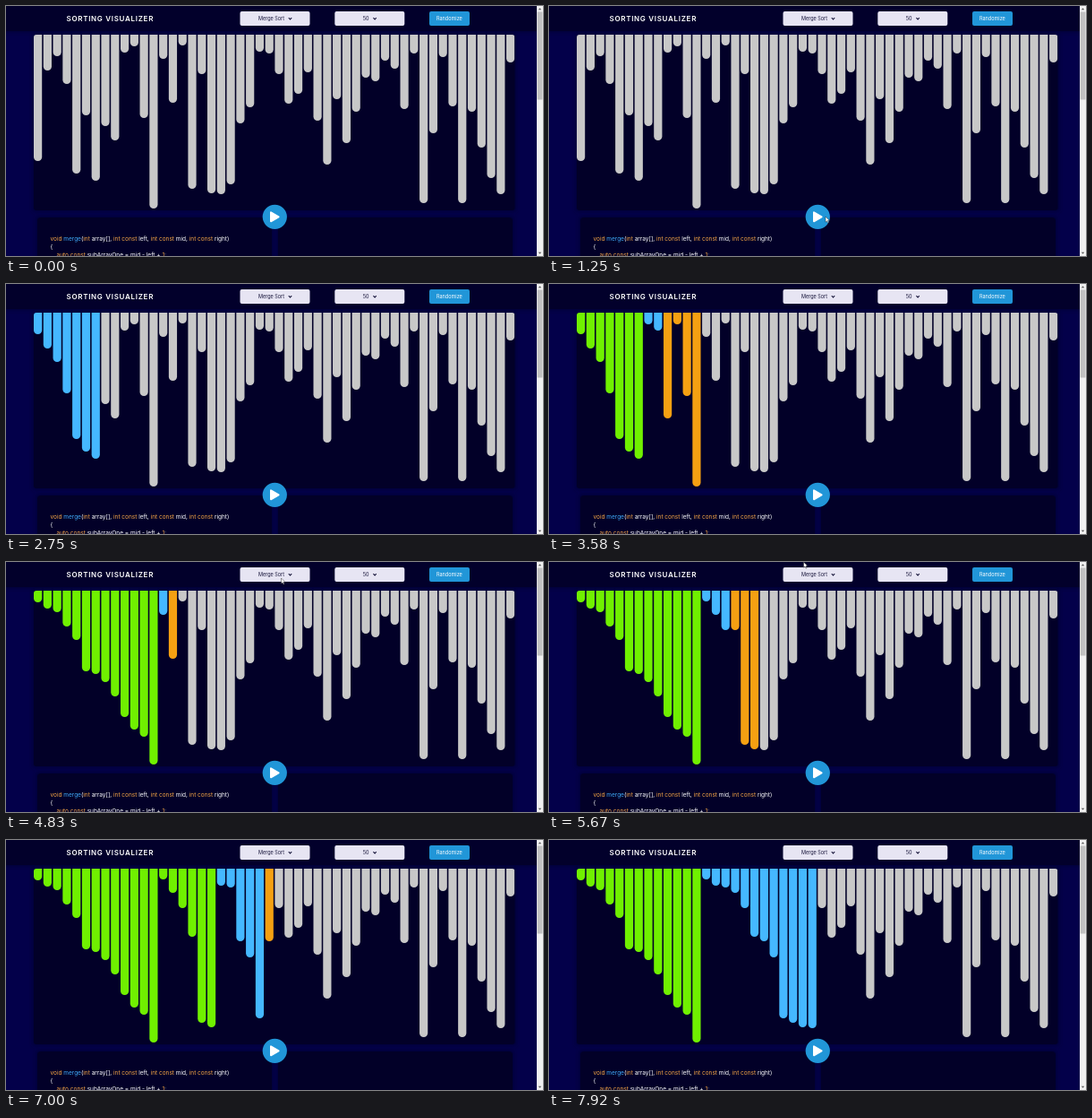
Recreate the animation shown at these times as an HTML page. Size 600 by 279 pixels, loop 8 s.

```html
<!DOCTYPE html>
<html lang="en">
<head>
<meta charset="utf-8">
<title>Sorting Visualizer</title>
<style>
  html, body { margin: 0; width: 100%; height: 100%; overflow: hidden; background: #03004a; }
  svg { display: block; width: 100%; height: 100%; }
  text { font-family: Inter, Roboto, sans-serif; white-space: pre; }
  .ui { font-size: 5.5px; }
  .code { font-size: 6.5px; fill: #fff; }
  .k { fill: #f5a545; }
  .f { fill: #3fa9f5; }
</style>
</head>
<body>
<svg viewBox="0 0 600 279">
  <defs>
    <filter id="soft" x="-10%" y="-20%" width="120%" height="140%"><feGaussianBlur stdDeviation="2"/></filter>
    <clipPath id="frame"><rect x="31" y="32" width="537.5" height="196" rx="3"/></clipPath>
  </defs>
  <rect width="600" height="279" fill="#03004a"/>
  <g fill="#020036" filter="url(#soft)">
    <rect x="-10" y="-10" width="620" height="39"/>
    <rect x="30" y="31" width="540" height="198"/>
    <rect x="34" y="235" width="264" height="60"/>
    <rect x="303" y="235" width="264" height="60"/>
  </g>
  <rect width="593" height="28" fill="#02002b"/>
  <g fill="#020028">
    <rect x="31" y="32" width="537.5" height="196" rx="3"/>
    <rect x="35" y="236" width="262" height="60" rx="4"/>
    <rect x="304" y="236" width="262" height="60" rx="4"/>
  </g>

  <text x="67.5" y="17" font-size="8" font-weight="600" letter-spacing=".7" fill="#fff">SORTING VISUALIZER</text>
  <g fill="#e7e5f3">
    <rect x="261.5" y="6" width="78" height="16" rx="2"/>
    <rect x="367.3" y="6" width="78" height="16" rx="2"/>
  </g>
  <rect x="473" y="6" width="45" height="16" rx="2" fill="#2196d8"/>
  <g class="ui" fill="#17153a">
    <text x="282" y="16">Merge Sort</text>
    <text x="398.7" y="16">50</text>
  </g>
  <text class="ui" x="481" y="16" fill="#fff">Randomize</text>
  <path d="M315.8 13.2l1.7 1.7 1.7-1.7M410.4 13.2l1.7 1.7 1.7-1.7" fill="none" stroke="#17153a" stroke-width="1.1"/>

  <g id="bars" clip-path="url(#frame)"></g>

  <g class="code">
    <text x="49.5" y="261.5"><tspan class="k">void </tspan><tspan class="f">merge</tspan>(<tspan class="k">int </tspan>array[], <tspan class="k">int const </tspan>left, <tspan class="k">int const </tspan>mid, <tspan class="k">int const </tspan>right)</text>
    <text x="49.5" y="270.5">{</text>
    <text x="56.5" y="280"><tspan class="k">auto const </tspan>subArrayOne = mid - left + <tspan class="k">1</tspan>;</text>
  </g>

  <circle cx="300.3" cy="235.3" r="13.6" fill="#2196d8"/>
  <path d="M296 230.3v10l8.6-5z" fill="#fff" stroke="#fff" stroke-width="2" stroke-linejoin="round"/>

  <rect x="593" width="7" height="279" fill="#f1f1f1"/>
  <rect x="593.6" y="6.5" width="5.8" height="98" fill="#c1c1c1"/>
  <path d="M594.8 4.2l1.7-2 1.7 2zM594.8 274.8l1.7 2 1.7-2z" fill="#555"/>

  <path id="cursor" d="M0 0v6.2l1.5-1.3 1 2.2 1-.4-1-2.2h2z" fill="#fff" stroke="#111" stroke-width=".4"/>
</svg>
<script>
const LOOP = 8000, TICK = 1000 / 12;
const FIRST_WRITE = 1337, WRITE_GAP = 70.9;
const HITCHES = [47, 63, 69, 87];
const TOP = 32, PITCH = 10.776, WIDTH = 9.2;
const GREY = '#c8c8c8', ORANGE = '#f5a012', BLUE = '#45b8ff', GREEN = '#70f000';

// Lower end of each bar
const ends = [
  173, 72, 56, 87, 187, 122, 195, 134, 150, 52, 45, 125, 226, 59, 108, 44, 204,
  76, 209, 210, 199, 131, 113, 51, 53, 76, 109, 98, 74, 128, 177, 104, 153, 118,
  80, 84, 61, 70, 115, 53, 220, 142, 57, 112, 220, 118, 158, 192, 210, 63
];

// Pointer way points: time, x, y
const trail = [
  [0, 604, 150], [560, 604, 150], [1000, 309, 235], [2250, 309, 235],
  [2700, 330, 284], [4400, 330, 284], [4830, 307.5, 18], [5170, 284.5, 0],
  [5820, 284.5, 0], [5830, 284.5, -12], [LOOP, 284.5, -12]
];

function recordSort(start) {
  const vals = start.slice(), cols = start.map(() => GREY);
  const states = [];
  const save = () => states.push({ vals: vals.slice(), cols: cols.slice() });

  function merge(lo, mid, hi) {
    const a = vals.slice(lo, mid + 1), b = vals.slice(mid + 1, hi + 1);
    cols.fill(ORANGE, lo, hi + 1);
    for (let i = lo; i <= hi; i++) {
      const fromA = a.length && (!b.length || a[0] <= b[0]);
      vals[i] = (fromA ? a : b).shift();
      cols[i] = BLUE;
      save();
    }
    cols.fill(GREEN, lo, hi + 1);
  }

  function sort(lo, hi) {
    if (lo >= hi) return;
    const mid = (lo + hi) >> 1;
    sort(lo, mid);
    sort(mid + 1, hi);
    merge(lo, mid, hi);
  }

  save();
  sort(0, vals.length - 1);
  return states;
}

const states = recordSort(ends);
const holder = document.getElementById('bars');
const cursor = document.getElementById('cursor');
const bars = ends.map((_, i) => {
  const bar = document.createElementNS('http://www.w3.org/2000/svg', 'rect');
  const attrs = { x: 31 + i * PITCH, y: TOP - 8, width: WIDTH, rx: WIDTH / 2 };
  for (const key in attrs) bar.setAttribute(key, attrs[key]);
  return holder.appendChild(bar);
});

function pointerAt(t) {
  const i = Math.max(1, trail.findIndex(p => p[0] >= t));
  const [t0, x0, y0] = trail[i - 1], [t1, x1, y1] = trail[i];
  const u = (t - t0) / (t1 - t0), s = u * u * (3 - 2 * u);
  return [x0 + (x1 - x0) * s, y0 + (y1 - y0) * s];
}

function draw(ms) {
  let tick = Math.floor((ms % LOOP + 4) / TICK) % 96;
  if (HITCHES.includes(tick)) tick--;
  const t = tick * TICK;
  const n = Math.max(0, Math.floor((t - FIRST_WRITE) / WRITE_GAP) + 1);
  const { vals, cols } = states[n];
  bars.forEach((bar, i) => {
    bar.setAttribute('height', vals[i] - TOP + 8);
    bar.setAttribute('fill', cols[i]);
  });
  cursor.setAttribute('transform', `translate(${pointerAt(t)})`);
}

const begin = performance.now();
function loop() {
  draw(performance.now() - begin);
  requestAnimationFrame(loop);
}
loop();
</script>
</body>
</html>
```
